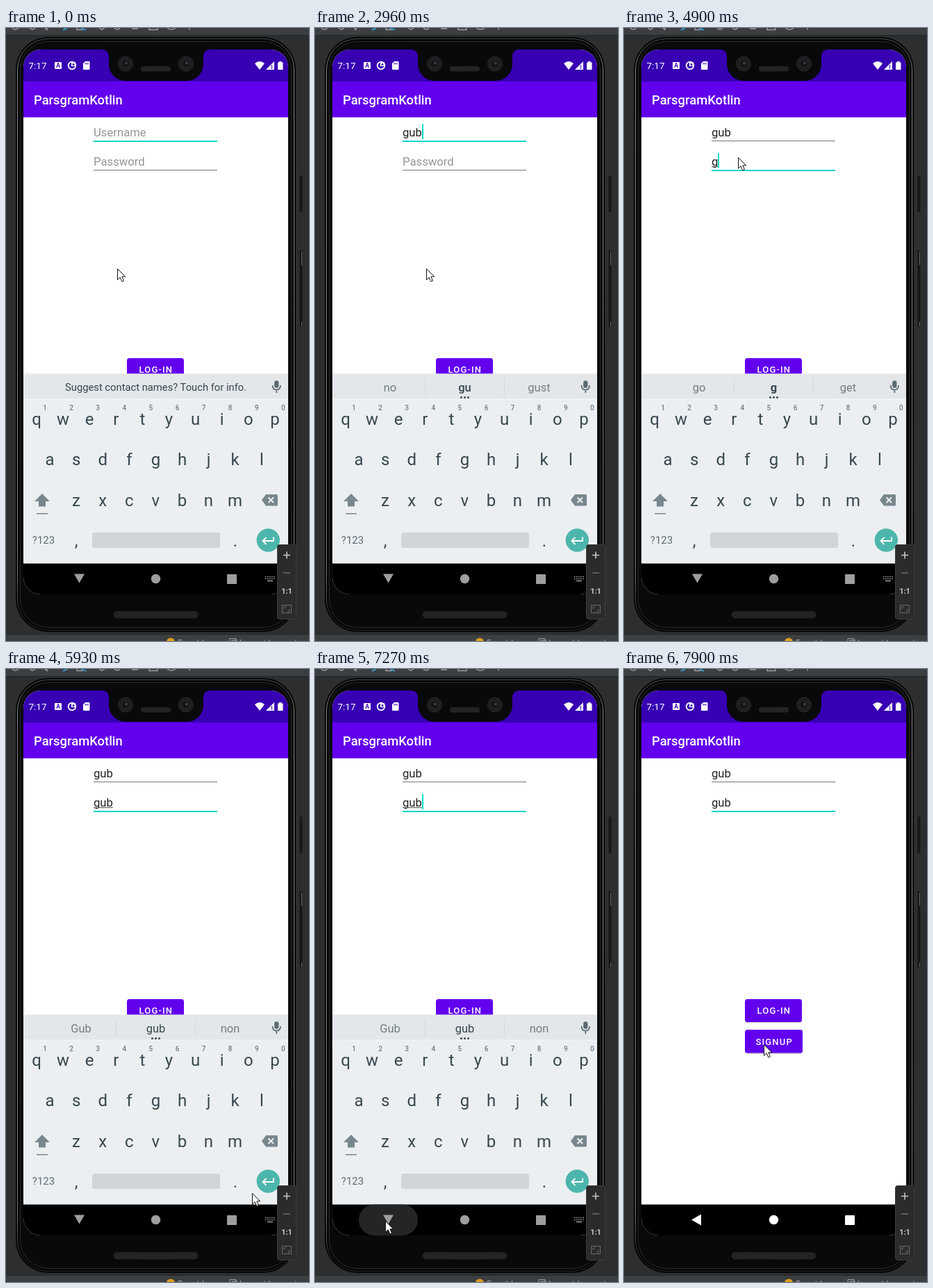
Write an HTML page that moves like this. It is 436x882 px and loops after 8000 ms.

```html
<!DOCTYPE html>
<html lang="en">
<head>
<meta charset="utf-8">
<title>Log-in screen</title>
<style>
html, body { margin: 0; width: 100%; height: 100%; overflow: hidden; background: #2d2e2f; }
svg { display: block; width: 100%; height: 100%; font-family: Roboto, "Open Sans", sans-serif; }
.mid { text-anchor: middle; }
.key { font-size: 24px; fill: #37474f; text-anchor: middle; }
.hint { font-size: 10px; font-weight: 500; fill: #6f7c83; text-anchor: middle; }
.field { font-size: 16.7px; }
.word { font-size: 16.5px; fill: #737d83; text-anchor: middle; }
.btn { font-size: 13px; font-weight: 500; letter-spacing: 1.16px; fill: #fff; }
</style>
</head>
<body>
<svg viewBox="0 0 436 882">
  <defs>
    <clipPath id="screen"><rect x="25" y="31" width="381" height="784" rx="25"/></clipPath>
    <clipPath id="page"><rect x="25" y="129" width="381" height="641.5"/></clipPath>
    <linearGradient id="rim" x1="0" x2="0" y1="0" y2="1">
      <stop offset="0" stop-color="#4a4a4a"/><stop offset=".06" stop-color="#8c8c8c"/>
      <stop offset=".9" stop-color="#7c7c7c"/><stop offset=".98" stop-color="#222"/>
    </linearGradient>
    <pattern id="mesh" width="4" height="4" patternUnits="userSpaceOnUse">
      <rect width="4" height="4" fill="#1b1b1b"/><path d="M0 0L4 4M4 0L0 4" stroke="#303030" stroke-width=".8"/>
    </pattern>
  </defs>

  <!-- window edges -->
  <rect width="436" height="882" fill="#2d2e2f"/>
  <rect width="436" height="10" fill="#3c3f41"/>
  <rect y="10" width="436" height="1.5" fill="#272829"/>
  <g fill="none" stroke="#9da0a2" stroke-width="1.4">
    <path d="M9 0Q13 4.500 18 0M34 0L38 2.500L42 0M56 0L59 2.500V0M102 0V2.500H110V0M134 0L138 2.500L142 0M156 0Q160 4 164 0M181 1H190M206 0V2.500H218V0M232 0Q238 4.500 244 0M264 0V2.500"/>
    <path d="M82 3L88 0M108 0L115 3" stroke="#3592c4" stroke-width="2"/>
  </g>
  <rect y="873" width="436" height="9" fill="#3c3f41"/>
  <rect y="872" width="436" height="1" fill="#282929"/>
  <circle cx="237" cy="883.500" r="6" fill="#dd9c1c"/>
  <g font-family="Inter, sans-serif" font-size="12" fill="#a9abad"><text x="247" y="889">Event Log</text><text x="336" y="889">Layout Inspector</text></g>
  <path d="M322 882V878.500H331V882M325 882V881H333" fill="none" stroke="#9da0a2"/>

  <!-- phone body -->
  <g fill="#161616" stroke="#232323"><rect x="422.500" y="212" width="4" height="53" rx="2"/><rect x="422.500" y="320" width="4" height="110" rx="2"/></g>
  <path d="M425.500 322V341M425.500 423V429" stroke="#6c6c6c"/>
  <rect x="14" y="13" width="403" height="856" rx="47" fill="#070707"/>
  <rect x="16.500" y="15.500" width="398" height="851" rx="44.500" fill="none" stroke="url(#rim)"/>
  <rect x="20.500" y="19.500" width="390" height="843" rx="40.500" fill="#090909" stroke="#2b2b2b"/>
  <rect x="155" y="839.500" width="121" height="9.500" rx="4.700" fill="url(#mesh)" stroke="#222"/>

  <g clip-path="url(#screen)">
    <rect x="25" y="30" width="381" height="785" fill="#fff"/>
    <rect x="25" y="30" width="381" height="47" fill="#3700b3"/>
    <rect x="25" y="77" width="381" height="51.500" fill="#6200ee"/>
    <text x="40" y="110" font-size="18.4" font-weight="500" fill="#fff">ParsgramKotlin</text>

    <!-- status icons -->
    <text x="32.500" y="59" font-size="13.5" fill="#fff">7:17</text>
    <rect x="70" y="49" width="10" height="10" rx="1" fill="#fff"/>
    <text x="75" y="57.300" class="mid" font-size="8.5" font-weight="700" fill="#3700b3">A</text>
    <circle cx="95" cy="54" r="5.300" fill="none" stroke="#fff" stroke-width="1.8"/>
    <path d="M94 49H100V55H94Z" fill="#fff"/>
    <circle cx="97" cy="52.500" r="1.500" fill="#3700b3"/>
    <path d="M114 48H119.500Q120.500 48 120.500 49V59Q120.500 60 119.500 60H112Q111 60 111 59V51Z" fill="#fff"/>
    <path d="M114 50V52.500M116 50V52.500M118 50V52.500" stroke="#3700b3"/>
    <path d="M358 51Q365 45 372 51L365 60Z" fill="#fff"/>
    <path d="M374 60L386 48V60Z" fill="#fff"/><path d="M382.500 53V59" stroke="#3700b3"/>
    <path d="M391 49.500H393V48H396.500V49.500H398.500V60H391Z" fill="#fff"/>

    <!-- fields -->
    <g class="field">
      <text id="userHint" x="126" y="155.500" fill="#949494">Username</text>
      <text id="passHint" x="126" y="197.500" fill="#949494">Password</text>
      <text id="user" x="126" y="155.500" fill="#212121"></text>
      <text id="pass" x="126" y="197.500" fill="#212121"></text>
    </g>
    <rect id="userLine" x="126" width="178"/>
    <rect id="passLine" x="126" width="178"/>
    <rect id="compose" x="126" y="199" height="1" fill="#555"/>
    <rect id="userCaret" y="138" width="2" height="22" fill="#03dac5"/>
    <rect id="passCaret" y="180" width="2" height="22" fill="#03dac5"/>

    <!-- buttons -->
    <g fill="#000" opacity=".16"><rect x="174" y="476" width="82" height="33.500" rx="4"/><rect x="174" y="520" width="83" height="34" rx="4"/></g>
    <rect x="174" y="475" width="82" height="33" rx="3.500" fill="#6200ee"/>
    <rect x="174" y="519" width="83" height="33.500" rx="3.500" fill="#6200ee"/>
    <text class="btn" x="191.500" y="496">LOG-IN</text>
    <text class="btn" x="189.500" y="541">SIGNUP</text>

    <g clip-path="url(#page)">
      <g id="board">
        <rect x="25" y="497.500" width="381" height="274" fill="#eceff1"/>
        <rect x="25" y="497.500" width="381" height="36.500" fill="#e3e7ea"/>
        <rect x="25" y="533.500" width="381" height="1" fill="#f6f8f9"/>
        <text id="info" x="85" y="522" font-size="14.75" fill="#37474f">Suggest contact names? Touch for info.</text>
        <g id="words">
          <text class="word" x="108" y="522.500"></text>
          <text class="word" x="215.500" y="522.500" style="fill:#37474f"></text>
          <text class="word" x="322.500" y="522.500"></text>
          <path d="M158.500 505V528M272.500 505V528" stroke="#d3d8db"/>
          <g fill="#37474f"><circle cx="210.500" cy="531.500" r="1.500"/><circle cx="215.500" cy="531.500" r="1.500"/><circle cx="220.500" cy="531.500" r="1.500"/></g>
        </g>
        <g fill="none" stroke="#5c6b73" stroke-width="1.7">
          <rect x="387" y="508" width="4.600" height="9" rx="2.300" fill="#5c6b73"/>
          <path d="M383.500 514Q383.500 520.500 389.300 520.500Q395 520.500 395 514M389.300 520.500V525"/>
        </g>
        <g id="keys"></g>
        <path d="M52 670L63 681H57V688.500H47V681H41Z" fill="#78878e"/>
        <rect x="44" y="698" width="16" height="1.500" fill="#78878e"/>
        <path d="M374 671H389.500Q391 671 391 672.500V686Q391 687.500 389.500 687.500H374L368 679.300Z" fill="#78878e"/>
        <path d="M377.500 675.500L385 683M385 675.500L377.500 683" stroke="#eceff1" stroke-width="2"/>
        <text x="54" y="742" class="mid" font-size="15" fill="#5c6b73">?123</text>
        <rect x="124" y="726" width="184" height="22" rx="3.500" fill="#d1d5d8"/>
        <circle cx="377.300" cy="737" r="16.700" fill="#4db6ac"/>
        <path d="M385 732.500V738H370M374.500 733L369.500 738L374.500 743" fill="none" stroke="#fff" stroke-width="1.9"/>
      </g>
    </g>

    <!-- navigation -->
    <rect x="25" y="770.500" width="381" height="45" fill="#000"/>
    <rect id="ripple" x="63" y="770.500" width="85" height="44.500" rx="22" fill="#252525"/>
    <g id="nav">
      <path id="back"/>
      <circle cx="215.500" cy="792.500" r="6.700"/>
      <rect x="318" y="786" width="14" height="14" rx="1"/>
    </g>
    <g id="kbIcon" stroke="#9e9e9e" stroke-width="1.5">
      <path d="M373 789.500H387M373 792.500H387" stroke-dasharray="1.600 1.400"/>
      <path d="M376 795.500H384"/>
    </g>
  </g>

  <!-- notch -->
  <path d="M139 30V31A9 9 0 0 1 148 40V52A24 24 0 0 0 172 76H260A24 24 0 0 0 284 52V40A9 9 0 0 1 293 31V30Z" fill="#090909"/>
  <g id="cams"></g>
  <rect x="194" y="55" width="43" height="7.500" rx="3.700" fill="url(#mesh)"/>

  <!-- emulator tools -->
  <rect x="390.500" y="743.500" width="27" height="107" rx="3" fill="#2b2b2c" stroke="#3b3c3e"/>
  <path d="M399 758.500H409M404 753.500V763.500" stroke="#c4c6c8" stroke-width="1.6"/>
  <path d="M399 784H409" stroke="#696b6d" stroke-width="1.5"/>
  <text x="404" y="814" class="mid" font-size="11" font-weight="700" fill="#c4c6c8">1:1</text>
  <path d="M397.500 830.500H410.500V841.500H397.500ZM400 836V833H403M408 836V839H405" fill="none" stroke="#696b6d"/>

  <path id="mouse" d="M.500 .500V16.200L4.200 12.800L6.900 18.900L9.500 17.700L6.900 11.800H11.800Z" fill="#fff" stroke="#111"/>
</svg>
<script>
const LOOP = 8000;
const $ = id => document.getElementById(id);
const set = (el, attrs) => { for (const k in attrs) el.setAttribute(k, attrs[k]); };
const show = (el, on) => { el.style.display = on ? '' : 'none'; };

function add(parent, tag, attrs, text) {
  const el = document.createElementNS('http://www.w3.org/2000/svg', tag);
  set(el, attrs);
  if (text) el.textContent = text;
  parent.append(el);
}

const PITCH = 38.1;
function keyRow(letters, x, y) {
  [...letters].forEach((c, i) => add($('keys'), 'text', { class: 'key', x: x + i * PITCH, y }, c));
}
keyRow('qwertyuiop', 44, 571);
keyRow('asdfghjkl', 63, 629);
keyRow('zxcvbnm', 101, 688);
keyRow(',', 101, 746);
keyRow('.', 330, 746);
[...'1234567890'].forEach((c, i) => add($('keys'), 'text', { class: 'hint', x: 56 + i * PITCH, y: 550 }, c));

for (const cx of [172, 259]) {
  add($('cams'), 'circle', { cx, cy: 51.5, r: 10.5, fill: '#1d1d1f', stroke: '#2b2b2d' });
  add($('cams'), 'circle', { cx, cy: 51.5, r: 6, fill: '#141416', stroke: '#303033' });
  add($('cams'), 'circle', { cx: cx + 1, cy: 50.5, r: 2, fill: '#3d3d44' });
}

// Each track is a list of [time, ...value]; a value holds until the next.
const tracks = {
  user: [[0, ''], [2450, 'g'], [2720, 'gu'], [2960, 'gub']],
  pass: [[0, ''], [4780, 'g'], [5020, 'gu'], [5140, 'gub']],
  strip: [[0], [2570, 'go', 'g', 'get', 700], [2840, 'no', 'gu', 'gust', 500], [3080, 'Gub', 'gub', 'non', 400],
    [4350], [4900, 'go', 'g', 'get', 700], [5020, 'no', 'gu', 'gust', 500], [5140, 'Gub', 'gub', 'non', 400]],
  focus: [[0, 'user'], [4230, 'pass']],
  caret: [[0, 0], [120, 1], [650, 0], [1050, 1], [1580, 0], [2080, 1], [3630, 0], [4110, 1],
    [5690, 0], [6200, 1], [6710, 0], [7130, 1], [7660, 0]],
  mouse: [[0, 160, 346], [3360, 87, 304], [3510, 100, 282], [3630, 126, 236], [3750, 152, 200], [3870, 164, 186],
    [5570, 196, 285], [5690, 270, 520], [5810, 336, 718], [5930, 354, 754],
    [6080, 310, 753], [6200, 205, 752], [6330, 84, 751], [6450, 13, 752],
    [6590, 30, 776], [6710, 64, 792], [6860, 87, 796], [7010, 95, 795], [7130, 101, 794],
    [7660, 132, 718], [7780, 184, 588], [7900, 201, 540]],
  ripple: [[0, 0], [7270, 1], [7420, .6], [7540, 0]],
  board: [[0, 0, 1], [7420, 14, 1], [7540, 130, .7], [7660, 273, 0]]
};

function at(name, t) {
  let found;
  for (const step of tracks[name]) if (step[0] <= t) found = step;
  return found.slice(1);
}

const pen = document.createElement('canvas').getContext('2d');
function textWidth(s) {
  pen.font = '16.7px Roboto, "Open Sans", sans-serif';
  return pen.measureText(s).width;
}

function field(name, lineY, t, focus, caret) {
  const [text] = at(name, t), active = focus === name;
  $(name).textContent = text;
  show($(name + 'Hint'), !text);
  set($(name + 'Line'), active
    ? { y: lineY, height: 2, fill: '#03d5c9' }
    : { y: lineY, height: 1, fill: '#777' });
  show($(name + 'Caret'), active && caret);
  set($(name + 'Caret'), { x: 126 + Math.round(textWidth(text)) });
  return text;
}

function draw(t) {
  const [focus] = at('focus', t), [caret] = at('caret', t);
  field('user', 162, t, focus, caret);
  const pass = field('pass', 204, t, focus, caret);
  set($('compose'), { width: t < 7540 ? textWidth(pass) : 0 });

  const strip = at('strip', t), words = $('words').querySelectorAll('.word');
  show($('info'), !strip.length);
  show($('words'), strip.length);
  words.forEach((el, i) => { el.textContent = strip[i] || ''; });
  words[1].style.fontWeight = strip[3] || 400;

  const [drop, alpha] = at('board', t), open = t < 7540;
  set($('board'), { transform: `translate(0 ${drop})`, opacity: alpha });
  set($('ripple'), { opacity: at('ripple', t)[0] });
  set($('nav'), { fill: open ? '#9e9e9e' : '#fff' });
  set($('back'), { d: open ? 'M98 785.5H113L105.5 798.5Z' : 'M97 792.5L111 784.5V800.5Z' });
  show($('kbIcon'), open);

  const [x, y] = at('mouse', t);
  set($('mouse'), { transform: `translate(${x} ${y})` });
}

const start = performance.now();
function tick() {
  draw((performance.now() - start) % LOOP);
  requestAnimationFrame(tick);
}
tick();
</script>
</body>
</html>
```
